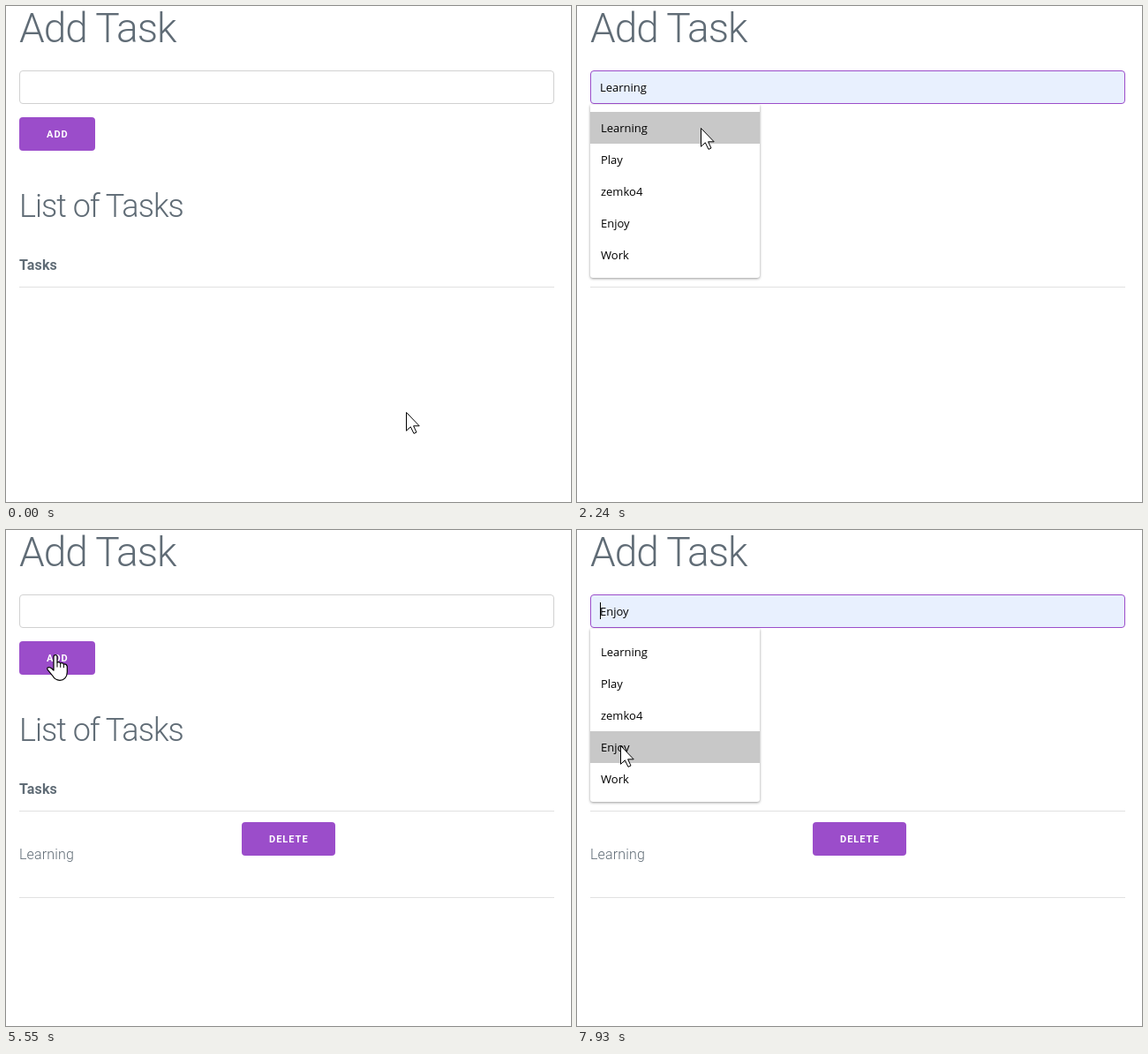
Animation, 640 px wide and 562 px high, one loop 8000 ms. Source, as an HTML page:

```html
<!DOCTYPE html>
<html lang="en">
<head>
<meta charset="utf-8">
<title>Add Task</title>
<style>
  html, body { margin: 0; width: 100%; height: 100%; overflow: hidden; background: #fff; }
  svg { display: block; width: 640px; height: 562px; }
  text { font-family: Roboto, Arial, sans-serif; font-weight: 300; fill: #606c76; white-space: pre; }
  .h1 { font-size: 46px; letter-spacing: -1px; }
  .h2 { font-size: 36px; letter-spacing: -1px; }
  .cell { font-size: 16px; letter-spacing: .16px; }
  .head { font-weight: 700; }
  .btn { font-size: 11px; font-weight: 700; letter-spacing: 1px; fill: #fff; }
  .value { font-size: 16px; fill: #000; }
  .menu { font-family: "Open Sans", "Noto Sans", sans-serif; font-size: 13px; font-weight: 400; fill: #000; }
  .shadow { filter: drop-shadow(0 1px 1.5px rgba(0, 0, 0, .4)); }
  .rule { fill: #e1e1e1; }
  .cursor { fill: #fff; stroke: #000; stroke-linejoin: round; }
</style>
</head>
<body>
<svg viewBox="0 0 640 562">
  <rect width="640" height="562" fill="#fff"/>
  <text class="h1" x="15" y="41">Add Task</text>
  <rect id="field" x="15.5" y="73.5" width="605" height="37" rx="3.5"/>
  <text id="value" class="value" x="26" y="97">Learning</text>
  <text id="preview" class="menu" x="26" y="97"></text>
  <rect id="caret" y="82" width="1" height="19"/>

  <rect id="add" x="15" y="126" width="86" height="38" rx="4"/>
  <text class="btn" x="46" y="149">ADD</text>
  <text class="h2" x="15" y="239">List of Tasks</text>
  <text class="cell head" x="15" y="299">Tasks</text>
  <rect class="rule" x="15" y="318" width="606" height="1"/>

  <g id="row">
    <text class="cell" x="15" y="373">Learning</text>
    <rect x="267" y="331" width="106" height="38" rx="4" fill="#9b4dca"/>
    <text class="btn" x="298" y="354">DELETE</text>
    <rect class="rule" x="15" y="416" width="606" height="1"/>
  </g>

  <g id="menu">
    <path class="shadow" d="M15 112H207V305a3 3 0 0 1-3 3H18a3 3 0 0 1-3-3Z" fill="#fff"/>
    <rect id="mark" x="15" width="192" height="36" fill="#c8c8c8"/>
    <g id="items"></g>
  </g>

  <circle id="click" r="12" fill="#ff0" fill-opacity=".5"/>
  <g id="arrow" class="cursor">
    <path d="M.5 .5V21.3L5.3 16.8L9 24.4L12 23L8.6 15.8H15.2Z"/>
  </g>
  <g id="hand" class="cursor">
    <path stroke-width="1.2" d="M-3 2.6Q-3 .7-1 .7Q1 .7 1 2.6V9Q3.4 8 4.6 10Q7.2 9 8.3 11Q11.4 10.4 12.3 13.5V20
      C12.3 26 8.5 29.3 4 29.3C-1 29.3-3 26.5-4.5 23.8L-10 17.2Q-11 14.6-8 14.5Q-6 14.8-3 18Z"/>
    <path fill="none" d="M1 9V14.5M4.7 10V14.8M8.4 11V15.2"/>
  </g>
  <g id="beam" class="cursor">
    <path fill="none" d="M-3.5-7H-1M1-7H3.5M-1-7L0-6.3L1-7M0-6.5V6.5M-3.5 7H-1M1 7H3.5M-1 7L0 6.3L1 7"/>
  </g>
</svg>
<script>
const LOOP = 8000, PURPLE = '#9b4dca', SLATE = '#606c76';
const TASKS = ['Learning', 'Play', 'zemko4', 'Enjoy', 'Work'];
const el = id => document.getElementById(id);

// pointer: time, x, y, kind
const PATH = [
  [0, 453, 460, 'arrow'], [70, 366, 329, 'arrow'],
  [280, 340, 290, 'arrow'], [360, 290, 220, 'arrow'], [440, 245, 163, 'arrow'], [520, 220, 133, 'arrow'],
  [800, 212, 127, 'arrow'], [870, 196, 117, 'arrow'], [950, 180, 106, 'beam'],
  [1020, 166, 101, 'beam'], [1100, 157, 98, 'beam'], [1170, 153.5, 96.5, 'beam'],
  [1830, 150.5, 100.5, 'beam'], [1910, 146.5, 109.5, 'beam'], [1980, 141, 121, 'arrow'],
  [2060, 140, 130, 'arrow'], [2140, 140, 136, 'arrow'], [2220, 140, 138, 'arrow'],
  [2840, 128, 136, 'arrow'], [2920, 104, 133, 'arrow'], [2990, 82, 132, 'hand'],
  [3080, 72, 135, 'hand'], [3150, 64, 138, 'hand'], [3230, 59, 140, 'hand'], [3310, 57, 141, 'hand'],
  [3860, 57, 141, 'none'], [4180, 57, 141, 'hand'],
  [6240, 60, 136, 'hand'], [6330, 69, 127, 'hand'], [6420, 80, 114, 'arrow'],
  [6500, 89.5, 103.5, 'beam'], [6590, 92.5, 99.5, 'beam'],
  [7680, 84.5, 109.5, 'beam'], [7770, 66, 165, 'arrow'], [7850, 53, 218, 'arrow'], [7930, 49, 244, 'arrow']
];

// page state: each step changes only what it names
const STEPS = [
  [0, { focus: 0, open: 0, filled: 0, hover: -1, caret: 0, dark: 0, row: 0, click: 0 }],
  [1420, { focus: 1, open: 1, caret: 26 }],
  [1910, { caret: 0 }],
  [2060, { hover: 0 }],
  [2290, { click: 1 }],
  [2370, { open: 0, hover: -1, filled: 1, caret: 87 }],
  [2460, { click: 0 }],
  [3080, { dark: 1, caret: 0 }],
  [3550, { caret: 87 }],
  [3690, { click: 1 }],
  [3770, { focus: 0, caret: 0 }],
  [3860, { click: 0 }],
  [5550, { filled: 0, dark: 0, row: 1 }],
  [6240, { dark: 1 }],
  [6420, { dark: 0 }],
  [6850, { click: 1 }],
  [6920, { focus: 1, open: 1, caret: 26 }],
  [7020, { click: 0 }],
  [7440, { caret: 0 }],
  [7770, { hover: 1 }],
  [7850, { hover: 2 }],
  [7930, { hover: 3, caret: 26 }]
];

el('items').innerHTML = TASKS
  .map((name, i) => `<text class="menu" x="27" y="${143 + 36 * i}">${name}</text>`).join('');

const show = (id, on) => el(id).setAttribute('visibility', on ? 'inherit' : 'hidden');
const set = (id, attrs) => { for (const k in attrs) el(id).setAttribute(k, attrs[k]); };

function draw(t) {
  const s = Object.assign({}, ...STEPS.filter(step => step[0] <= t).map(step => step[1]));
  const [, x, y, kind] = PATH.filter(p => p[0] <= t).pop();
  const hovered = s.hover >= 0;

  set('field', { fill: s.filled || hovered ? '#e8f0fe' : '#fff', stroke: s.focus ? PURPLE : '#d1d1d1' });
  show('value', s.filled);
  el('preview').textContent = hovered ? TASKS[s.hover] : '';
  show('caret', s.caret);
  set('caret', { x: s.caret });
  set('add', { fill: s.dark ? SLATE : PURPLE });
  show('row', s.row);
  show('menu', s.open);
  show('mark', hovered);
  set('mark', { y: 120 + 36 * s.hover });

  show('click', s.click);
  set('click', { cx: x - (kind === 'beam' ? 2.5 : 0), cy: y - .5 });
  for (const id of ['arrow', 'hand', 'beam']) {
    show(id, id === kind);
    set(id, { transform: `translate(${x} ${y})` });
  }
}

const start = performance.now();
function tick() {
  draw((performance.now() - start) % LOOP);
  requestAnimationFrame(tick);
}
tick();
</script>
</body>
</html>
```
